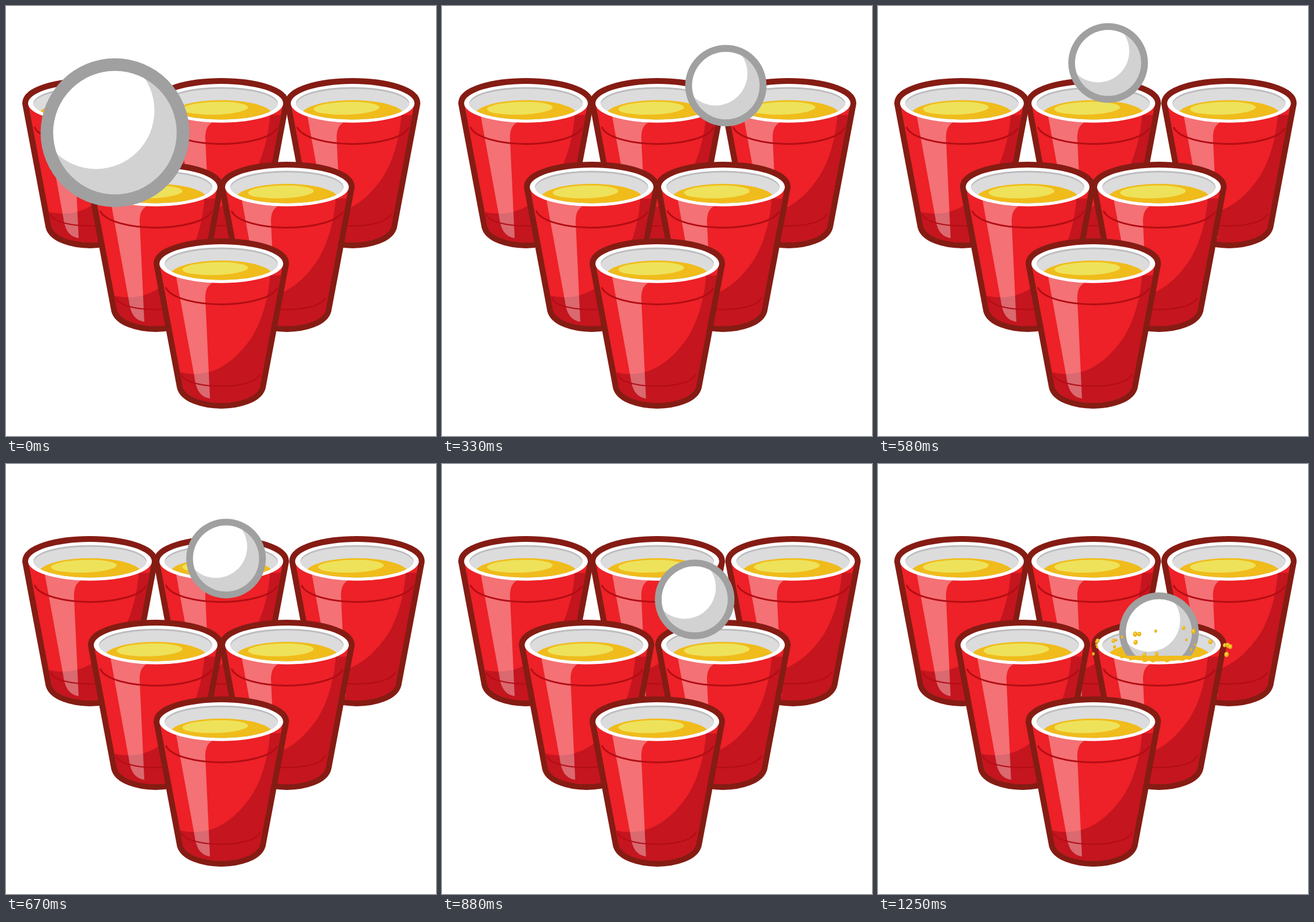
Write an HTML page with a canvas that moves like this. It is 740 px wide and 740 px high and loops after 1.29 s.

```html
<!DOCTYPE html>
<html lang="en">
<head>
<meta charset="utf-8">
<title>Cup pong</title>
<style>
html, body { margin: 0; width: 100%; height: 100%; overflow: hidden; background: #fff; }
canvas { display: block; width: 740px; height: 740px; }
</style>
</head>
<body>
<canvas id="stage" width="740" height="740"></canvas>
<script>
const ctx = document.getElementById('stage').getContext('2d');
const LOOP = 1290, STEP = 1000 / 24, LAST = 30;
const GOLD = '#f0bc1b', PALE = '#eee25a', GLEAM = '#f3d548', LINE = '#b30d14';
const MID = 370.5, GAP = 113, ROWS = [167.4, 311.4, 443.4];
const AIM = MID + GAP;

// Cup paths, relative to the centre of the rim
const BODY = 'M-106.5 0L-66.5 212C-62 229-31 239.5 0 239.5C31 239.5 62 229 66.5 212L106.5 0';
const cup = {
  outline: new Path2D(BODY + 'A106.5 33.3 0 0 0-106.5 0Z'),
  body: new Path2D(BODY + 'Z'),
  shade: new Path2D('M84 20C81 60 70 98 54 124C27 165-14 202-74 186V250H120V20Z'),
  shine: new Path2D('M-79 15L-46 196C-43 218-36 229-19.5 232L-27.5 60Q-28 35-10 31L-20 15Z'),
  band: new Path2D('M-95 42C-86 60-42 70 0 70C42 70 86 60 96 43'),
  base: new Path2D('M-68 192C-61 205-31 211 0 211C31 211 60 204 66 191')
};

// Where the ball turns; lift is the arc height of the way there, pace its easing
const TURNS = [
  { n: 1, x: 187.5, y: 218 },
  { n: 8, x: 488.5, y: 137, lift: 31, pace: 1.29 },
  { n: 9, x: 516, y: 158, lift: 2 },
  { n: 14, x: 396, y: 98, lift: 15 },
  { n: 17, x: 370, y: 243, lift: 36 },
  { n: 24, x: AIM, y: 294, lift: 40 }
];

const unit = v => Math.max(0, Math.min(1, v));
const easeOut = v => 1 - (1 - unit(v)) ** 2;

function seeded(seed) {
  return () => (seed = seed * 16807 % 2147483647) / 2147483647;
}

function ballAt(n) {
  const i = Math.max(1, TURNS.findIndex(p => n <= p.n));
  const last = n > 24;
  const a = last ? TURNS[4] : TURNS[i - 1], b = last ? TURNS[5] : TURNS[i];
  const u = unit((n - a.n) / (b.n - a.n)), k = Math.max(0, n - 1);
  return {
    x: a.x + (b.x - a.x) * u ** (b.pace || 1),
    y: a.y + (b.y - a.y) * u - b.lift * 4 * u * (1 - u) - 4.5 * unit((n - 25) / 5),
    r: k < 8 ? Math.max(68.5, 128 - 9.54 * k + 0.179 * k * k) : 68.5
  };
}

function oval(x, y, rx, ry, fill, turn = 0) {
  ctx.beginPath();
  ctx.ellipse(x, y, rx, ry, turn, 0, Math.PI * 2);
  ctx.fillStyle = fill;
  ctx.fill();
}

function fillPath(path, color) {
  ctx.fillStyle = color;
  ctx.fill(path);
}

function line(path, color, width) {
  ctx.strokeStyle = color;
  ctx.lineWidth = width;
  ctx.stroke(path);
}

function drawCup(x, y, glint) {
  ctx.save();
  ctx.translate(x, y);
  ctx.lineJoin = ctx.lineCap = 'round';
  line(cup.outline, '#851c14', 20);
  ctx.save();
  ctx.clip(cup.body);
  fillPath(cup.body, '#ed2127');
  fillPath(cup.shade, '#c5151f');
  fillPath(cup.shine, 'rgba(255,255,255,.36)');
  ctx.restore();
  line(cup.band, LINE, 3);
  line(cup.base, LINE, 2.2);
  oval(0, 0, 106.5, 33.3, '#fff');
  oval(0, 0, 97.5, 28, '#bdbdbf');
  ctx.clip();
  oval(0, 3, 97.5, 28, '#dcdcdd');
  oval(0, 22, 90, 27.5, GOLD);
  if (glint) oval(-10.5, 8.5, 56.5, 11, PALE, -0.03);
  ctx.restore();
}

function drawCups(n, sunk) {
  ROWS.forEach((y, row) => {
    const count = 3 - row;
    for (let i = 0; i < count; i++) {
      let x = MID + (2 * i - count + 1) * GAP;
      if (row === 0 && i === 2) x += 7.5 * easeOut((n - 8) / 4);
      if (row === 1 && i === 0) x -= 9 * easeOut((n - 16) / 6);
      drawCup(x, y, !(sunk && row === 1 && i === 1));
    }
  });
}

function drawBall({ x, y, r }, sunk) {
  ctx.save();
  if (sunk) {
    ctx.beginPath();
    ctx.rect(0, 0, 740, 330);
    ctx.clip();
  }
  oval(x, y, r, r, '#a0a0a0');
  oval(x, y, r * 0.83, r * 0.83, '#d2d2d2');
  ctx.clip();
  oval(x - r * 0.254, y - r * 0.297, r * 0.785, r * 0.785, '#fff');
  ctx.restore();
}

// A crown of fingers, tallest right of the centre
function drawSplash(size) {
  const tips = [];
  let d = 'M401 326';
  for (let i = 0; i < 8; i++) {
    const foot = 412 + 20.5 * i;
    const x = foot + (foot - AIM) * 0.05;
    const y = 325 - size * (12 + 12 * (i % 2) + 40 * Math.exp(-2 * (i - 4) ** 2));
    d += `Q${foot - 4} 320 ${x - 3} ${y}H${x + 3}Q${foot + 4} 320 ${foot + 10} 320`;
    tips.push([x, y]);
  }
  fillPath(new Path2D(d + 'L567 324Q545 339 484 339Q422 339 401 326Z'), GOLD);
  ctx.lineCap = 'round';
  for (const [x, y] of tips) {
    const tilt = (x - AIM) / 150;
    oval(x, y, 4.5, 7 * size, GOLD, tilt);
    line(new Path2D(`M${x - 1} ${y - 3}q2 3 1 7`), GLEAM, 1.5);
  }
}

// Drops fly outwards, higher above the middle of the cup
function drawDrops(u) {
  const rand = seeded(77);
  for (let i = 0; i < 26; i++) {
    const side = rand() * 2 - 1;
    const x = AIM + 5 + side * 118 * (0.72 + 0.28 * u);
    const y = 330 - rand() * 26 - rand() ** 2 * (1 - side * side) * 50 - 40 * u * (1 - u);
    const r = 2 + rand() * 2.6;
    oval(x, y, r * 0.85, r, '#e9b31a', 0.2);
    if (r > 3) oval(x - 0.6, y - 0.8, r * 0.4, r * 0.5, GLEAM);
  }
  // Ragged edge of the settling liquid
  for (let i = 0; i < 8; i++) {
    const a = Math.PI * (0.2 + 0.6 * (i + rand() * 0.6) / 8);
    oval(AIM + 95 * Math.cos(a), ROWS[1] + 27 * Math.sin(a), 5, 2 + rand() * 1.5, GOLD, -0.3);
  }
}

function draw(n) {
  const sunk = n >= 23;
  ctx.fillStyle = '#fff';
  ctx.fillRect(0, 0, 740, 740);
  drawCups(n, sunk);
  drawBall(ballAt(n), sunk);
  if (sunk && n < 28) drawSplash(n < 25 ? unit((n - 22) / 2) : 1 - (n - 25) / 4);
  if (n > 25) drawDrops((n - 25) / 5);
}

let start;
function tick(now) {
  if (start === undefined) start = now;
  const t = (now - start) % LOOP;
  draw(Math.min(LAST, Math.floor((t + 5) / STEP)));
  requestAnimationFrame(tick);
}
draw(0);
requestAnimationFrame(tick);
</script>
</body>
</html>
```
